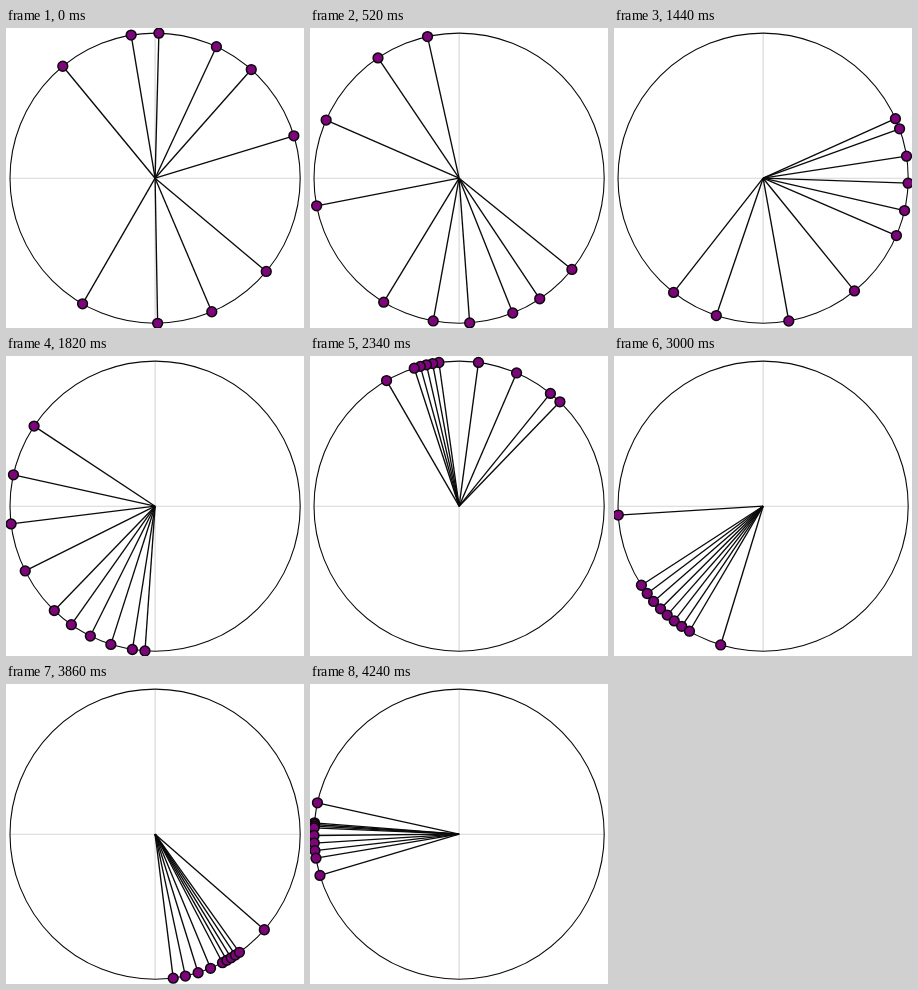
These frames come from a looping animation (298 by 300 pixels, 4.26 s). An HTML page with a canvas:

```html
<!DOCTYPE html>
<html lang="en">
<head>
<meta charset="utf-8">
<title>Coupled oscillators</title>
<style>
  html, body { margin: 0; width: 100%; height: 100%; overflow: hidden; background: #fff; }
  canvas { display: block; }
</style>
</head>
<body>
<canvas id="stage" width="298" height="300"></canvas>
<script>
const ctx = document.getElementById('stage').getContext('2d');
const LOOP = 4260, STEP = 20;
const CX = 149.1, CY = 150.2, R = 145.1, DOT = 4.9;
const INK = '#0a0a0a', AXIS = '#d6d6d6', PURPLE = '#7d047a';

// Ten dots, ordered from the leader to the last; angles in degrees, counter-clockwise.
const START = [-120, -89, -67, -40, 17, 48.5, 65, 88.5, 99.5, 129.5];

// The swarm at a moment: leader, second, middle, last but one, last.
// The other dots are spread evenly between these ranks.
const RANKS = [0, 1, 4, 8, 9];
function swarm(time, turns, ...marks) {
  const deg = START.map((_, rank) => {
    const k = Math.max(0, RANKS.findIndex(r => r >= rank) - 1);
    const u = (rank - RANKS[k]) / (RANKS[k + 1] - RANKS[k]);
    return marks[k] + (marks[k + 1] - marks[k]) * u - 360 * turns;
  });
  return { time, deg };
}

const poses = [
  { time: 0, deg: START },
  swarm(1060, 1, -36, -21, 91, 140, 147),
  swarm(1820, 2, 146.5, 167.5, 226, 261, 266),
  swarm(2340, 2, 46, 51, 98, 108, 120),
  swarm(3000, 3, 183.5, 213, 225, 239.5, 253),
  swarm(3500, 3, 24, 31, 54, 60.5, 77.5),
  swarm(4240, 4, 167.5, 175.5, 177.5, 189.5, 196.5)
];
const last = poses.length - 1;
const span = k => poses[k + 1].time - poses[k].time;
const chord = (k, i) => (poses[k + 1].deg[i] - poses[k].deg[i]) / span(k);

// Speed at a pose: neighbouring chords, each weighted by the other's span.
function speed(k, i) {
  if (k === 0) return chord(0, i);
  if (k === last) return chord(last - 1, i);
  const before = span(k - 1), after = span(k);
  return (chord(k - 1, i) * after + chord(k, i) * before) / (before + after);
}

function angleAt(i, t) {
  let k = 0;
  while (k < last - 1 && t >= poses[k + 1].time) k++;
  const u = (t - poses[k].time) / span(k), v = 1 - u;
  return poses[k].deg[i] * (1 + 2 * u) * v * v + poses[k + 1].deg[i] * u * u * (3 - 2 * u)
    + span(k) * u * v * (speed(k, i) * v - speed(k + 1, i) * u);
}

function line(x1, y1, x2, y2, color, width) {
  ctx.strokeStyle = color;
  ctx.lineWidth = width;
  ctx.beginPath();
  ctx.moveTo(x1, y1);
  ctx.lineTo(x2, y2);
  ctx.stroke();
}

function circle(x, y, r, width, fill) {
  ctx.beginPath();
  ctx.arc(x, y, r, 0, 2 * Math.PI);
  if (fill) {
    ctx.fillStyle = fill;
    ctx.fill();
  }
  ctx.strokeStyle = INK;
  ctx.lineWidth = width;
  ctx.stroke();
}

function draw(t) {
  ctx.fillStyle = '#fff';
  ctx.fillRect(0, 0, 298, 300);
  line(CX - R, CY, CX + R, CY, AXIS, 1.1);
  line(CX, CY - R, CX, CY + R, AXIS, 1.1);
  circle(CX, CY, R, 1.1);

  const dots = START.map((_, i) => {
    const a = angleAt(i, t) * Math.PI / 180;
    return [CX + R * Math.cos(a), CY - R * Math.sin(a)];
  });
  for (const [x, y] of dots) line(CX, CY, x, y, INK, 1.35);
  for (const [x, y] of dots) circle(x, y, DOT, 1.5, PURPLE);
}

const start = performance.now();
function tick() {
  const t = (performance.now() - start) % LOOP;
  draw(Math.floor(t / STEP) * STEP);
  requestAnimationFrame(tick);
}
tick();
</script>
</body>
</html>
```
